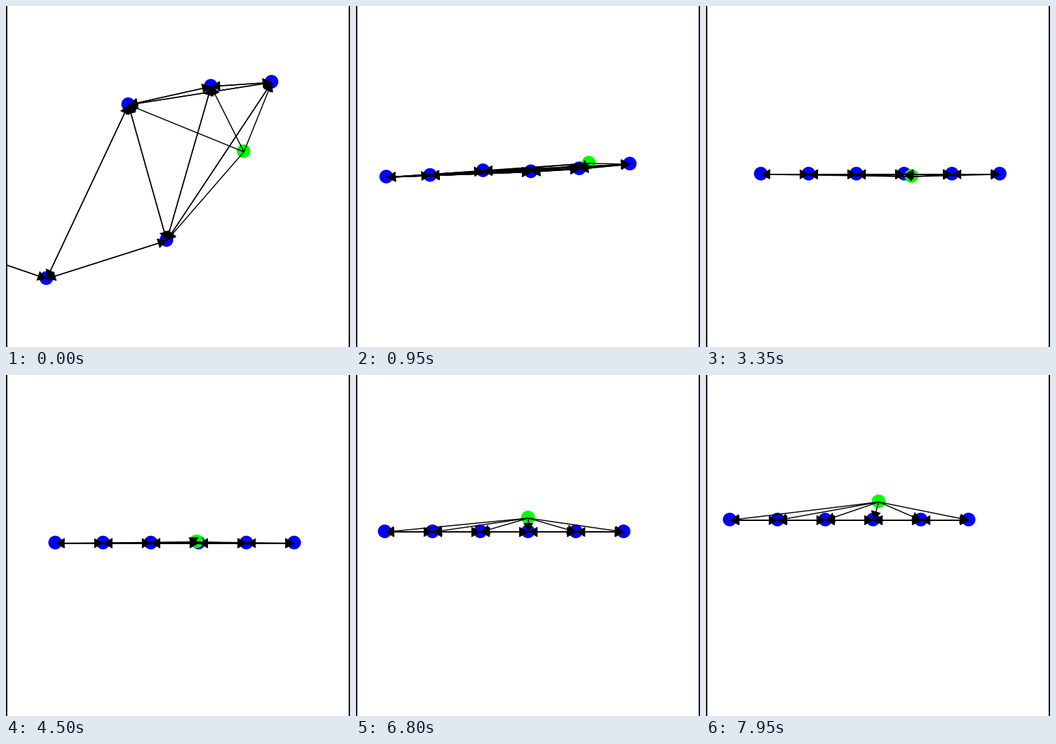
A matplotlib script that plays this animation: 504 by 500 pixels, repeating every 8 s.

```python
import numpy as np
import matplotlib.pyplot as plt
from matplotlib.animation import FuncAnimation
from matplotlib.collections import LineCollection, PolyCollection
from matplotlib.patches import Circle, Rectangle

W, H, DPI = 504, 500, 100
FRAMES, STEP = 160, 50   # STEP in ms
SUB = 10                 # simulation steps per frame
GAP = 70                 # spacing of the line formation
REACH = 300              # longest link
RADIUS, RIM, HEAD = 10, 9, 8
COUPLING, PULL = 0.7, 1.0
SHIFT = np.array([0.5, 1.0])
START = np.array([[59, 399], [-150, 327], [179, 144],
                  [235, 343], [300, 117], [389, 111]], float)


def leader(t):
    return np.array([300 + 49 * np.cos(0.403 * (t + 0.5)),
                     191.2 + 58 * np.cos(0.36 * (t - 3.3))])


def slots(t):
    """Places in the line: it sways sideways and later climbs."""
    x = 59 + 24.5 * np.cos(0.59 * (t - 2.85))
    y = 246 - (2.3 if t > 4.1 else 0.6) * (t - 4.1) ** 2
    return np.column_stack([x + GAP * np.arange(len(START)), np.full(len(START), y)])


def simulate():
    """Followers drift to their slots and even out their errors with neighbours."""
    dt = STEP / 1000 / SUB
    err = START - slots(0)
    track = []
    for n in range(FRAMES * SUB):
        pos = slots(n * dt) + err
        if n % SUB == 0:
            track.append(pos)
        near = np.linalg.norm(pos[:, None] - pos[None], axis=2) < REACH
        spread = (near[..., None] * (err[None] - err[:, None])).sum(axis=1)
        err = err + dt * (COUPLING * spread - PULL * err)
    return track


def arrow(a, b):
    """Line from a to the rim of b, and the triangle centred on its end."""
    d = b - a
    end = b - d / max(np.hypot(*d), 1e-6) * RIM
    v = end - a
    ang = np.arctan2(v[1], v[0]) + np.radians([0, 120, 240])
    return [a, end], end + HEAD * np.column_stack([np.cos(ang), np.sin(ang)])


track = simulate()

fig = plt.figure(figsize=(W / DPI, H / DPI), dpi=DPI, facecolor="white")
ax = fig.add_axes([0, 0, 1, 1])
ax.set_xlim(0, W)
ax.set_ylim(H, 0)
ax.axis("off")

for x in (0, W - 2):
    ax.add_patch(Rectangle((x, 0), 2, H, color="#17171a", lw=0, aa=False))

dots = [ax.add_patch(Circle((0, 0), RADIUS, color=c, lw=0, zorder=2))
        for c in ["#0000ff"] * len(START) + ["#00ff00"]]
lines = LineCollection([], colors="black", linewidths=1.5 * 72 / DPI, zorder=3)
heads = PolyCollection([], facecolors="black", edgecolors="black",
                       linewidths=0.5 * 72 / DPI, zorder=4)
ax.add_collection(lines, autolim=False)
ax.add_collection(heads, autolim=False)


def draw(i):
    pts = np.vstack([track[i], leader(i * STEP / 1000)])
    for dot, p in zip(dots, pts):
        dot.center = p
    pts = pts + SHIFT
    links = [arrow(a, b) for j, a in enumerate(pts) for k, b in enumerate(pts[:-1])
             if j != k and np.hypot(*(a - b)) < REACH]
    lines.set_segments([seg for seg, _ in links])
    heads.set_verts([tri for _, tri in links])
    return dots + [lines, heads]


anim = FuncAnimation(fig, draw, frames=FRAMES, interval=STEP, repeat=True,
                     repeat_delay=0, blit=False)
plt.show()
```
